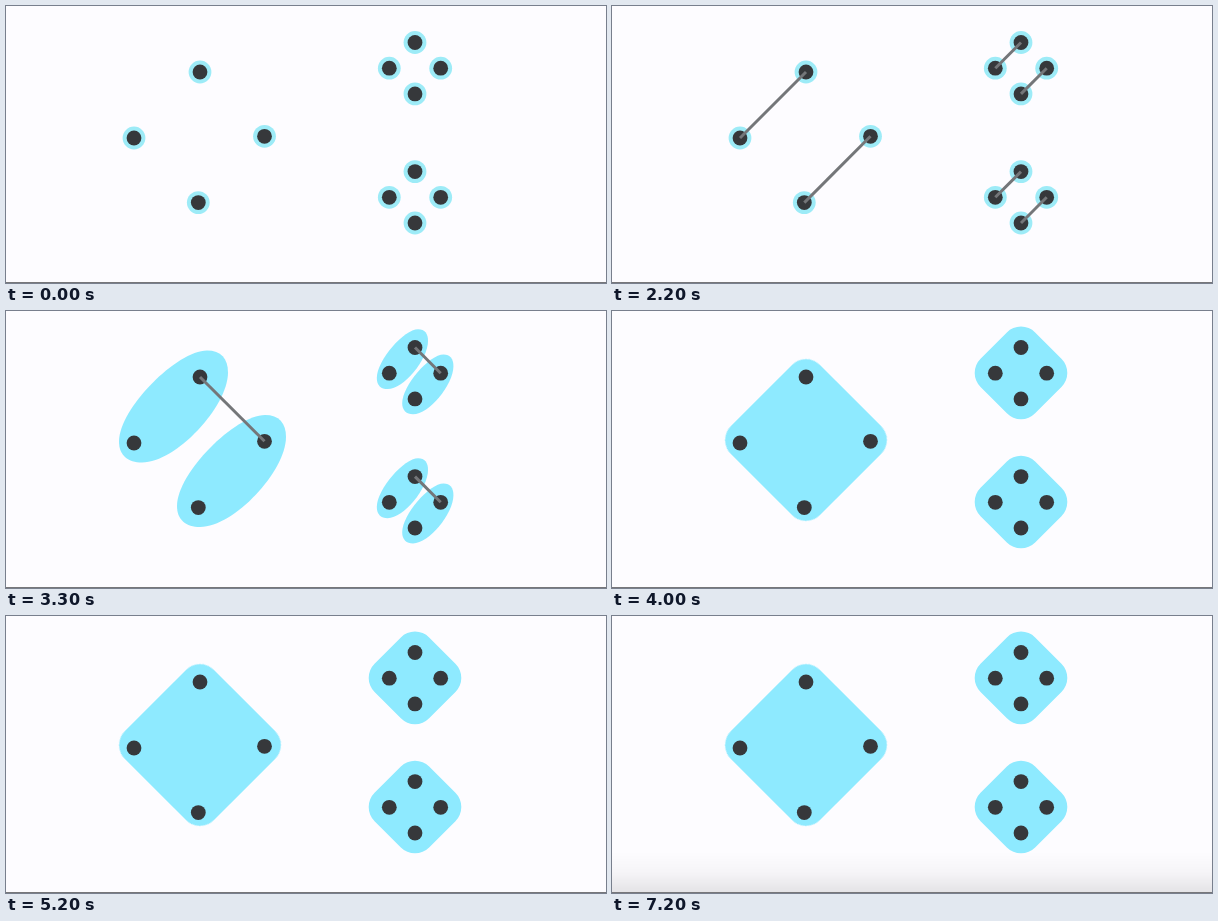
Animation, 600 px wide and 277 px high, one loop 8 s. Source, as an HTML page:

```html
<!DOCTYPE html>
<html lang="en">
<head>
<meta charset="utf-8">
<title>Merging clusters</title>
<style>
  html, body { margin: 0; width: 100%; height: 100%; overflow: hidden; background: #fdfcff; }
  svg { display: block; width: 100%; height: 100%; }
  .dot { fill: #36383b; }
  .halo { fill: #9debf7; }
  .blob { fill: #8eeaff; }
  .link {
    stroke: #747679; stroke-width: 3; fill: none;
    stroke-dasharray: 1 2; stroke-dashoffset: 1;
  }
  #halos, #pairs, #groups, #links1, #links2, #shade, #hand { animation: 8s step-end infinite; }
  #halos { animation-name: early; }
  #links1 { animation-name: first; }
  #pairs { animation-name: middle; }
  #links2 { animation-name: second; }
  #groups { animation-name: late; }
  #shade { animation-name: shade; }
  #hand { animation-name: hand; }
  #links1 .link { animation: draw1 8s linear infinite; }
  #links2 .link { animation: draw2 8s linear infinite; }

  @keyframes early { 0% { opacity: 1 } 28.75%, 100% { opacity: 0 } }
  @keyframes first { 0% { opacity: 0 } 18.75% { opacity: 1 } 28.75%, 100% { opacity: 0 } }
  @keyframes middle { 0% { opacity: 0 } 28.75% { opacity: 1 } 43.75%, 100% { opacity: 0 } }
  @keyframes second { 0% { opacity: 0 } 31.25% { opacity: 1 } 43.75%, 100% { opacity: 0 } }
  @keyframes late { 0% { opacity: 0 } 43.75%, 100% { opacity: 1 } }
  @keyframes shade { 0% { opacity: 0 } 71.25%, 100% { opacity: 1 } }
  @keyframes hand { 0% { opacity: 0 } 71.25% { opacity: 1 } 72.5%, 100% { opacity: 0 } }
  @keyframes draw1 {
    0% { stroke-dashoffset: 1 }
    18.75% { stroke-dashoffset: 1; animation-timing-function: ease-in-out }
    26.875%, 100% { stroke-dashoffset: 0 }
  }
  @keyframes draw2 {
    0% { stroke-dashoffset: 1 }
    31.25% { stroke-dashoffset: 1; animation-timing-function: ease-in-out }
    40.625%, 100% { stroke-dashoffset: 0 }
  }
</style>
</head>
<body>
<svg viewBox="0 0 600 277" preserveAspectRatio="none">
  <defs>
    <linearGradient id="fade" x1="0" y1="0" x2="0" y2="1">
      <stop offset="0" stop-color="#000" stop-opacity="0"/>
      <stop offset=".5" stop-color="#000" stop-opacity=".03"/>
      <stop offset="1" stop-color="#000" stop-opacity=".1"/>
    </linearGradient>
    <path id="bean" d="M0 91C0 58 58 0 88 0C102 0 109 8 109 22C109 56 57 112 23 112C9 112 0 105 0 91Z"/>
  </defs>
  <rect width="600" height="277" fill="#fdfcff"/>
  <rect id="shade" y="236" width="600" height="41" fill="url(#fade)"/>
  <g id="halos"></g>
  <g id="pairs"></g>
  <g id="groups"></g>
  <g id="dots"></g>
  <g id="links1"></g>
  <g id="links2"></g>
  <rect y="276" width="600" height="1" fill="#77777a"/>
  <path id="hand" fill="#fff" stroke="#111" stroke-width="1.4" stroke-linejoin="round"
    d="M41 264V255.200Q41 253.500 42.500 253.500Q44 253.500 44 255.200V259.500Q46.500 258.300 47 260.200Q49.300 259.200 49.800 261.200Q52.500 260.500 52.500 263V266Q52.500 268.500 51 271H43.500Q42.500 268.500 40 266.500Q37.500 264 38 262.800Q39 261.500 41 264ZM44 259.500V263.500M47 260.200V263.500M49.800 261.200V264"/>
</svg>
<script>
  const NS = 'http://www.w3.org/2000/svg';
  function add(layer, tag, attrs) {
    const el = document.createElementNS(NS, tag);
    for (const key in attrs) el.setAttribute(key, attrs[key]);
    document.getElementById(layer).appendChild(el);
  }
  function link(layer, a, b) {
    add(layer, 'path', { class: 'link', pathLength: 1, d: `M${a}L${b}` });
  }
  function bean(x, y, sx, sy) {
    add('pairs', 'use', { href: '#bean', class: 'blob', transform: `translate(${x} ${y}) scale(${sx} ${sy})` });
  }
  function diamond(x, y, side) {
    add('groups', 'rect', {
      class: 'blob', x: x - side / 2, y: y - side / 2, width: side, height: side,
      rx: 20, transform: `rotate(45 ${x} ${y})`
    });
  }
  function cluster(left, top, right, bottom) {
    for (const [cx, cy] of [left, top, right, bottom]) {
      add('halos', 'circle', { class: 'halo', cx, cy, r: 11.4 });
      add('dots', 'circle', { class: 'dot', cx, cy, r: 7.4 });
    }
    link('links1', left, top);
    link('links1', bottom, right);
    link('links2', top, right);
  }

  cluster([128, 132], [194, 66], [258.5, 130.3], [192.3, 196.6]);
  bean(113, 39.5, 1, 1);
  bean(171, 104, 1, 1);
  diamond(194, 129, 126);

  for (const y of [62.2, 191.3]) {
    cluster([383.3, y], [409, y - 25.7], [434.7, y], [409, y + 25.7]);
    bean(370.8, y - 44, .47, .535);
    bean(396.2, y - 18.8, .47, .535);
    diamond(409, y - .3, 77.2);
  }
</script>
</body>
</html>
```
